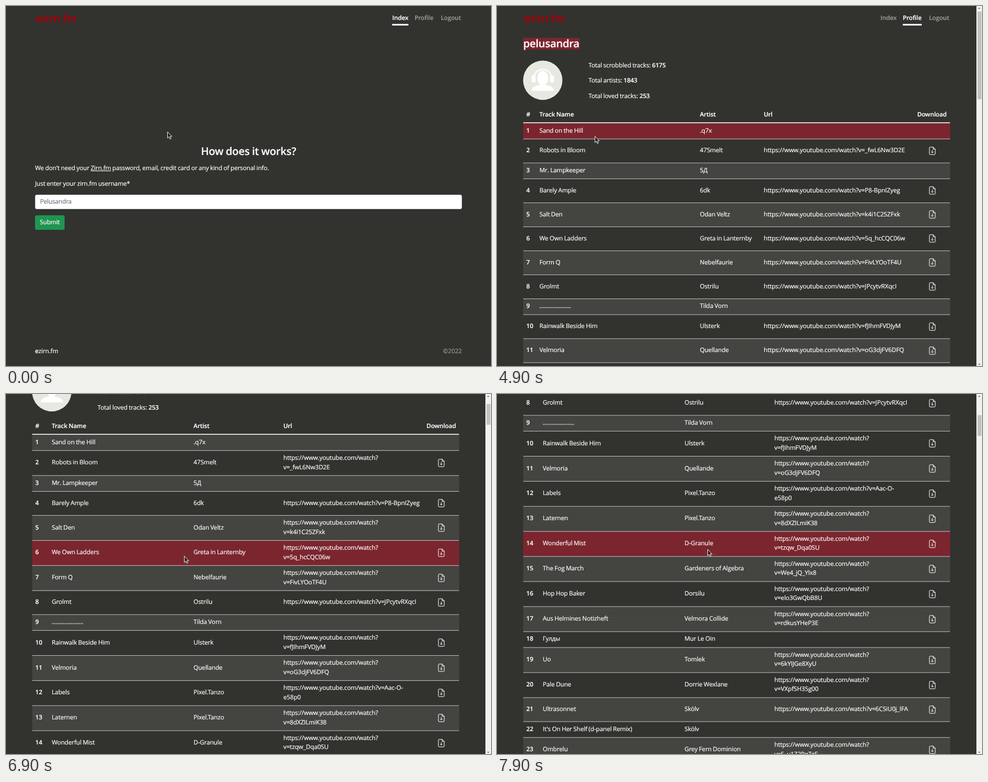
Animation, 869 px wide and 645 px high, one loop 8 s. Source, as an HTML page:

```html
<!DOCTYPE html>
<html lang="en">
<head>
<meta charset="utf-8">
<title>ezirn.fm</title>
<style>
  html, body { margin: 0; width: 100%; height: 100%; overflow: hidden; background: #32322e; }
  #stage {
    position: relative; width: 869px; height: 645px; overflow: hidden;
    background: #32322e; color: #fff;
    font: 11px/20px "Open Sans", "Noto Sans", sans-serif;
    letter-spacing: -.1px; word-spacing: -.4px;
    text-rendering: geometricPrecision;
    -webkit-text-stroke: .2px;
  }
  #stage div, .t { position: absolute; }
  .t { white-space: pre; }
  b, .b { font-weight: 600; }
  .big { font-size: 19px; font-weight: 600; letter-spacing: -.25px; }
  .logo { color: #a90007; }
  .dim { color: #979794; }
  .on { border-bottom: 3px solid #fff; height: 20px; line-height: 20px; }
  .mark { background: #7b262f; line-height: 21px; }
  .full { inset: 0; }
  #title { left: 0; width: 869px; top: 250px; text-align: center; }
  #field {
    left: 52px; top: 338px; width: 765px; height: 26px; box-sizing: border-box;
    border: 1px solid #ced4da; border-radius: 3px; background: #fff; color: #212529;
    display: flex; align-items: center; padding-left: 8px;
  }
  #hint { color: #6c757d; position: absolute; }
  #caret { width: 1px; height: 13px; background: #212529; }
  #submit {
    left: 52px; top: 375px; width: 53px; height: 26px; border-radius: 3px;
    background: #1f9551; line-height: 26px; text-align: center;
  }
  .table { left: 47px; top: 210.2px; width: 765px; }
  #stage .row { position: relative; }
  .row:nth-child(odd) { background: #444440; }
  #stage .row.hover { background: #7b262f; }
  #stage .cell {
    top: 0; bottom: 1px; display: flex; align-items: center;
    white-space: pre; line-height: 16.5px;
  }
  .row svg { position: absolute; left: 727px; top: 50%; margin-top: -8px; }
  .lines { position: absolute; left: 47px; top: 0; overflow: visible; }
  #bar { right: 0; top: 0; width: 10px; height: 645px; background: #f1f1f1; }
  #thumb { left: 2px; width: 7px; background: #c1c1c1; }
  .arrow { left: 3px; border: 2.5px solid transparent; }
  #cursor { position: absolute; left: 0; top: 0; overflow: visible; }
</style>
</head>
<body>
<div id="stage">
  <div id="index" class="full">
    <div id="title" class="big">How does it works?</div>
    <div id="field"><span id="hint">Pelusandra</span><span id="typed"></span><i id="caret"></i></div>
    <div id="submit">Submit</div>
  </div>
  <div id="profile" class="full">
    <div id="page" class="full">
      <svg width="72" height="72" style="position:absolute;left:46px;top:97px">
        <circle cx="36" cy="36" r="35.2" fill="#e8e8e3"/>
        <g fill="#fff">
          <ellipse cx="36" cy="32" rx="10" ry="13"/>
          <path d="M16 55q0-7 9-9l7-2h8l7 2q9 2 9 9z"/>
          <rect x="16" y="27" width="7" height="13" rx="3"/>
          <rect x="49" y="27" width="7" height="13" rx="3"/>
        </g>
        <path d="M21 28a15.5 15.5 0 0 1 30 0" fill="none" stroke="#fff" stroke-width="2"/>
      </svg>
    </div>
    <div id="bar">
      <div class="arrow" style="top:1px;border-bottom-color:#505050"></div>
      <div class="arrow" style="bottom:0;border-top-color:#505050"></div>
      <div id="thumb"></div>
    </div>
  </div>
  <svg id="cursor" width="10" height="15">
    <path d="M.5 .5V11.7L3 9.4 4.9 13.4 6.7 12.6 4.9 8.7H8.4Z" fill="#20201e" stroke="#fff" stroke-width=".9"/>
  </svg>
</div>
<script>
const $ = id => document.getElementById(id);
const add = (id, html) => $(id).insertAdjacentHTML('beforeend', html);
// y is the middle of the line
const at = (x, y, html, cls = '') =>
  `<span class="t ${cls}" style="left:${x}px;top:${y - 10}px">${html}</span>`;

const header = (dx, active) => at(53 + dx, 22, 'ezirn.fm', 'big logo') +
  [['Index', 692], ['Profile', 732], ['Logout', 779]].map(([name, x]) =>
    at(x + dx, 22, name, name === active ? 'b on' : 'b dim')).join('');

add('index', header(0, 'Index') +
  at(52, 291, "We don't need your <u>Zirn.fm</u> password, email, credit card or any kind of personal info.") +
  at(52, 318.5, 'Just enter your zirn.fm username*') +
  at(52, 619, '<b>e</b>zirn.fm') + at(783, 619, '©2022', 'dim'));

add('page', header(-5, 'Profile') +
  at(47, 67, 'pelusandra', 'big mark') +
  at(164, 106.5, 'Total scrobbled tracks: <b>6175</b>') +
  at(164, 134, 'Total artists: <b>1843</b>') +
  at(164, 161.5, 'Total loved tracks: <b>253</b>'));

// track | artist | video id; * keeps the address on one line, ~ marks its own break
const tracks = `Sand on the Hill|.q7x
Robots in Bloom|47Smelt|_fwL6Nw3D2E
Mr. Lampkeeper|5Д
Barely Ample|6dk|P8-BpnIZyeg*
Salt Den|Odan Veltz|k4i1C25ZFxk
We Own Ladders|Greta in Lanternby|5q_hcCQC06w
Form Q|Nebelfaurie|FivLYOoTF4U
Grolmt|Ostrilu|JPcytvRXqcI*
....................|Tilda Vorn
Rainwalk Beside Him|Ulsterk|fJIhmFVDJyM
Velmoria|Quellande|oG3djFV6DFQ
Labels|Pixel.Tanzo|Aac-O-~e58p0
Laternen|Pixel.Tanzo|8dXZILmiK38
Wonderful Mist|D-Granule|tzqw_Dqa0SU
The Fog March|Gardeners of Algebra|We4_jQ_Ylx8
Hop Hop Baker|Dorsilu|elo3GwQbB8U
Aus Helmines Notizheft|Velmora Collide|rdkusYHeP3E
Гулды|Mur Le Oin
Uo|Tomlek|6kYIJGe8XyU
Pale Dune|Dorrie Wexlane|VXpfSH3Sg00
Ultrasonnet|Skölv|6CSiU0j_lFA*
It's On Her Shelf (d-panel Remix)|Skölv
Ombrelu|Grey Fern Dominion|S_u1Z2PqTgE`.split('\n').map(line => line.split('|'));

const icon = `<svg width="12" height="15" fill="none" stroke="#fff">
  <path d="M7.5 .8H2.2Q.8 .8 .8 2.2V12.8Q.8 14.2 2.2 14.2H9.8Q11.2 14.2 11.2 12.8V4.5ZV4.5H11.2M6 6V11M4 9.2L6 11.2 8 9.2"/></svg>`;

function address(id, wrap) {
  const url = 'https://www.youtube.com/watch?';
  if (!wrap || id.endsWith('*')) return url + 'v=' + id.replace(/[*~]/, '');
  return id.includes('~') ? url + 'v=' + id.replace('~', '\n') : url + '\nv=' + id;
}

function makeTable(cols, wrap) {
  const table = document.createElement('div');
  table.className = 'full';
  const cell = (i, html, cls = '') =>
    `<div class="cell ${cls}" style="left:${cols[i] - 47}px">${html}</div>`;
  let top = 210.2;
  const ends = [];
  const rows = tracks.map(([name, artist, id], i) => {
    const url = id ? address(id, wrap) : '';
    const height = !id ? 28.4 : url.includes('\n') ? 44.9 : 43;
    ends.push(top += height);
    return `<div class="row" style="height:${height}px">` + cell(0, i + 1, 'b') +
      cell(1, name) + cell(2, artist) + cell(3, url) + (id ? icon : '') + '</div>';
  });
  // hairlines keep their fractional places
  const hairlines = ends.map(y => `M0 ${y - .4}H764.6`).join('');
  table.innerHTML = ['#', 'Track Name', 'Artist', 'Url', 'Download']
    .map((name, i) => at(cols[i], 195, name, 'b')).join('') +
    `<div class="table">${rows.join('')}</div>
    <svg class="lines" width="765" height="1200">
      <path d="${hairlines}" stroke="#dee2e6" stroke-width=".8"/>
      <path d="M0 209.2H764.6" stroke="#fff" stroke-width="1.5"/>
    </svg>`;
  $('page').append(table);
  return { table, ends, rows: table.querySelectorAll('.row') };
}
const wide = makeTable([52.5, 76, 363.5, 478, 753], false);
const narrow = makeTable([52.5, 82, 336, 497, 753.5], true);

const path = [[0, 289, 225], [100, 289, 225], [400, 245, 326], [500, 245, 326],
  [1000, 230, 332], [4100, 230, 332], [4400, 194, 310], [4500, 194, 310],
  [4700, 175, 233], [6000, 175, 233], [6500, 273, 284], [6900, 319, 290],
  [7500, 359, 284], [7900, 377, 278]];
const scrolls = [[0, 0], [6400, 0], [6500, 1], [6900, 137], [7500, 330], [7900, 494]];
const keyTimes = [1600, 1700, 1800, 1800, 2000, 2000, 2200, 2200, 2400, 2500];

function track(keys, t) {
  const i = keys.findIndex(k => k[0] > t);
  if (i < 0) return keys[keys.length - 1].slice(1);
  const [a, b] = [keys[i - 1], keys[i]];
  const p = (t - a[0]) / (b[0] - a[0]);
  return a.slice(1).map((v, j) => v + (b[j + 1] - v) * p);
}
const within = (t, a, b) => t >= a && t < b;
const show = (el, yes) => { el.style.display = yes ? '' : 'none'; };

function drawIndex(t) {
  const count = keyTimes.filter(k => t >= k).length;
  $('typed').textContent = 'pelusandra'.slice(0, count);
  show($('hint'), !count);
  const lit = within(t, 800, 1300) || within(t, 1600, 3100) || within(t, 3700, 4300);
  $('caret').style.opacity = lit ? 1 : 0;
  const focus = Math.min(1, Math.max(0, (t - 700) / 200));
  $('field').style.boxShadow = `0 0 0 2.75px rgba(13,110,253,${.28 * focus})`;
  $('field').style.borderColor = focus ? '#6a97de' : '';
}

function drawProfile(t, y) {
  const loaded = t >= 5400;
  const scroll = Math.round(track(scrolls, t)[0]);
  show(wide.table, !loaded);
  show(narrow.table, loaded);
  const { rows, ends } = loaded ? narrow : wide;
  const hovered = ends.findIndex(end => y + scroll < end);
  rows.forEach((row, i) => row.classList.toggle('hover', i === hovered));
  $('page').style.transform = `translateY(${-scroll}px)`;
  $('thumb').style.top = 10 + Math.round(scroll * .0567) + 'px';
  $('thumb').style.height = (loaded ? 37 : 157) + 'px';
}

const start = performance.now();
function draw() {
  const t = Math.floor((performance.now() - start) % 8000 / 100) * 100;
  const [x, y] = track(path, t).map(Math.round);
  const onProfile = t >= 4900;
  show($('index'), !onProfile);
  show($('profile'), onProfile);
  if (onProfile) drawProfile(t, y); else drawIndex(t);
  $('cursor').style.transform = `translate(${x}px,${y}px)`;
  requestAnimationFrame(draw);
}
draw();
</script>
</body>
</html>
```
